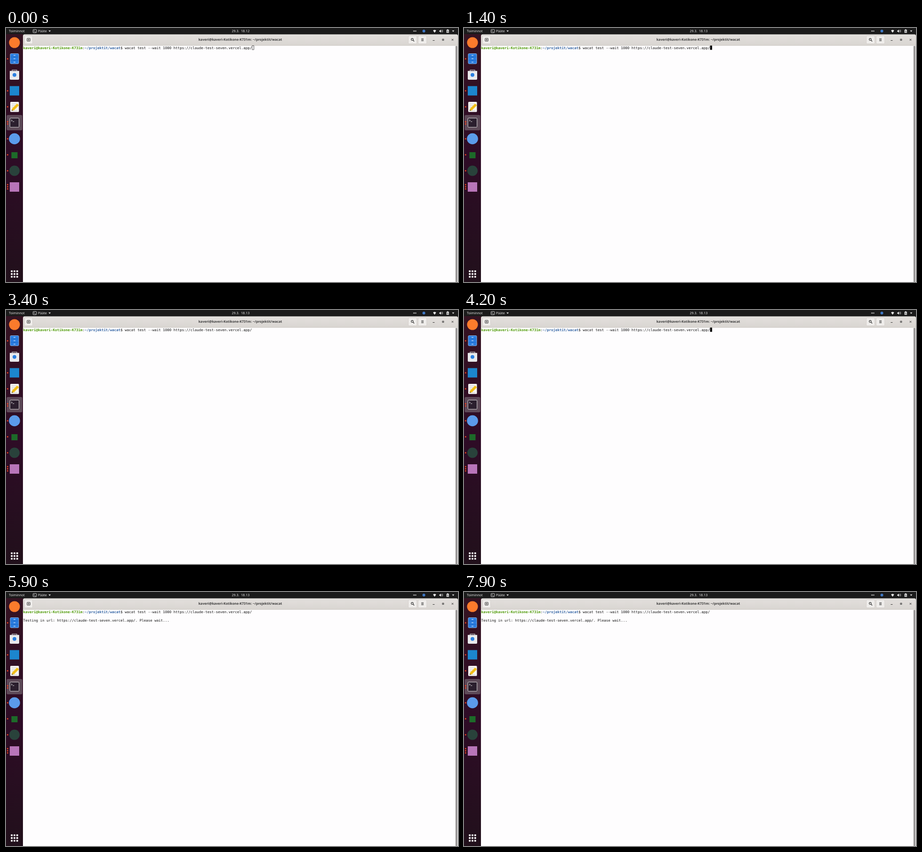
An HTML page that plays this animation: 960x540 px, repeating every 8 s.

```html
<!DOCTYPE html>
<html lang="fi">
<head>
<meta charset="utf-8">
<title>Terminal</title>
<style>
html, body { margin: 0; width: 100%; height: 100%; overflow: hidden; background: #fefdfe; }
svg { display: block; width: 960px; height: 540px; }
text { text-rendering: geometricPrecision; white-space: pre; }
.ui { font: 7.1px "Noto Sans", "Open Sans", sans-serif; fill: #e6e6e6; }
.title { font-weight: 700; fill: #3a3a3a; text-anchor: middle; }
.term { font: 7.475px "DejaVu Sans Mono", monospace; fill: #111; }
.user { font-weight: 700; fill: #4e9a06; }
.path { font-weight: 700; fill: #3465a4; }
.btn { fill: #efedeb; stroke: #cfc9c4; stroke-width: .7; }
.line { fill: none; stroke: #333; }
</style>
</head>
<body>
<svg viewBox="0 0 960 540" xmlns="http://www.w3.org/2000/svg">
  <defs>
    <linearGradient id="dock" x2="0" y2="1">
      <stop offset="0" stop-color="#351322"/>
      <stop offset=".5" stop-color="#2e0c26"/>
      <stop offset="1" stop-color="#21101b"/>
    </linearGradient>
    <linearGradient id="head" x2="0" y2="1">
      <stop offset="0" stop-color="#e3e0dd"/>
      <stop offset="1" stop-color="#d9d5d1"/>
    </linearGradient>
  </defs>

  <rect width="960" height="540" fill="#fefdfe"/>

  <!-- window header -->
  <rect x="36" y="13" width="924" height="6" fill="#1b1b1b"/>
  <path d="M36 37V17q0-3.5 3.5-3.5H956.500q3.500 0 3.500 3.500V37z" fill="url(#head)"/>
  <path d="M36 37.200H960" stroke="#c4beb9" stroke-width=".8"/>
  <rect class="btn" x="39.500" y="16.500" width="17" height="17" rx="2"/>
  <rect class="btn" x="854.500" y="16.500" width="18" height="17" rx="2"/>
  <rect class="btn" x="875.500" y="16.500" width="18" height="17" rx="2"/>
  <g class="line">
    <rect x="44.800" y="22" width="6.400" height="6" rx=".6"/>
    <path d="M46.300 25H49.700M48 23.300V26.700"/>
    <circle cx="862.800" cy="24.300" r="2.200" stroke-width="1.100"/>
    <path d="M864.400 25.900L867 28.500" stroke-width="1.300"/>
    <path d="M882 22.800H887M882 25H887M882 27.200H887"/>
    <path d="M906.300 26.500H910.300"/>
    <rect x="926.900" y="23.700" width="2.800" height="2.600"/>
    <path d="M946.600 23.200L950.200 26.800M950.200 23.200L946.600 26.800"/>
  </g>
  <text class="ui title" x="497.500" y="27.400">kaveri@kaveri-Kotikone-K731m: ~/projektit/wacat</text>

  <!-- scrollbar -->
  <rect x="953.500" y="37.600" width="6.500" height="503" fill="#ebe9e8"/>
  <rect x="955" y="38" width="3.500" height="502" rx="1.500" fill="#929090"/>

  <!-- top bar -->
  <rect width="960" height="13" fill="#1b1b1b"/>
  <text class="ui" x="6" y="9.200">Toiminnot</text>
  <text class="ui" x="68" y="9.200">Pääte</text>
  <text class="ui" id="clock" x="479.400" y="9.200"></text>
  <g fill="none" stroke="#e6e6e6" stroke-width=".9">
    <rect x="57.400" y="3.200" width="7.400" height="6.800" rx="1"/>
    <path d="M59 5L60.500 6.300L59 7.600M61.200 8.200H63"/>
  </g>
  <g fill="#e6e6e6">
    <path d="M90.300 5.300H95.100L92.700 8.300zM947.400 5.300H952.200L949.800 8.300z"/>
    <circle cx="865.800" cy="6.500" r="1"/>
    <circle cx="868.200" cy="6.500" r="1"/>
    <circle cx="870.600" cy="6.500" r="1"/>
    <path d="M910.300 10L907 5.500Q910.300 2.700 913.600 5.500z"/>
    <path d="M920.300 5.200H922L924 3.200V9.900L922 7.900H920.300z"/>
    <path d="M935.600 3.700H937V2.800H939.200V3.700H940.700V10.300H935.600z"/>
  </g>
  <path d="M925.200 4.800Q926.400 6.500 925.200 8.200M926.700 3.600Q928.800 6.500 926.700 9.400" fill="none" stroke="#e6e6e6" stroke-width=".8"/>
  <path d="M938.500 4.700L937 7.200H939.300L938 9.500" fill="none" stroke="#1b1b1b" stroke-width=".7"/>
  <circle cx="887.500" cy="6.500" r="3" fill="#3f78c4"/>

  <!-- dock -->
  <rect y="13" width="36" height="527" fill="url(#dock)"/>
  <rect x="2" y="185.500" width="32" height="31.500" rx="1.500" fill="#5d4a58" stroke="#756470" stroke-width=".6"/>
  <circle cx="18" cy="31" r="11.500" fill="#fb7b2c"/>

  <rect x="9" y="54.500" width="18" height="21.500" rx="1.800" fill="#2a7de0" stroke="#a9cdf4" stroke-width=".8"/>
  <path d="M9.500 61.600H26.500M9.500 68.800H26.500" stroke="#1c61b8" stroke-width=".7"/>
  <path d="M16 58.300H20M16 65.300H20M16 72.500H20" stroke="#e8f2fd" stroke-width="1.100"/>

  <path d="M13 92V89.300H23V92" fill="none" stroke="#b9bcc0" stroke-width="1.300"/>
  <path d="M8 91.300H28V108Q28 110 26 110H10Q8 110 8 108z" fill="#e9eaec"/>
  <circle cx="18" cy="99.800" r="4" fill="#2b7fe0"/>

  <rect x="8" y="123.500" width="20" height="20" fill="#1c86ce"/>

  <rect x="9" y="157" width="18.500" height="21.500" rx="1.600" fill="#f6f5f3"/>
  <path d="M11.500 161H22M11.500 164.500H19M11.500 168H16.500M11.500 175.500H24.500" stroke="#cbc9c7" stroke-width=".9"/>
  <path d="M13 171L23.500 160.500L27.500 164.500L17 175L12 176z" fill="#f6c421"/>
  <path d="M15 173L25.500 162.500" stroke="#dda20e" stroke-width="1"/>
  <path d="M12 176L12.600 173.200L14.800 175.400z" fill="#4d4238"/>

  <rect x="8.300" y="191.500" width="19.400" height="19.500" rx="1.600" fill="#2b1f2e" stroke="#d9d7d8" stroke-width="1"/>
  <path d="M11 195L13.300 196.700L11 198.400M14.300 199H17.300" fill="none" stroke="#fff" stroke-width=".9"/>

  <circle cx="18" cy="235.500" r="11.800" fill="#5b9bea"/>
  <rect x="11.500" y="264" width="13" height="13" fill="#1d6a29"/>
  <circle cx="18" cy="303.500" r="11" fill="#29423b"/>
  <rect x="8" y="328" width="20" height="20" fill="#b875b9"/>
  <g id="dots" fill="#e9431f"></g>
  <g id="grid" fill="#f4f2f3"></g>

  <!-- terminal -->
  <text class="term" x="36.500" y="45"><tspan class="user">kaveri@kaveri-Kotikone-K731m</tspan>:<tspan class="path">~/projektit/wacat</tspan>$ wacat test --wait 1000 https://claude-test-seven.vercel.app/</text>
  <text class="term" id="output" x="36.500" y="63">Testing in url: https://claude-test-seven.vercel.app/. Please wait...</text>
  <rect id="cursor"/>
</svg>
<script>
const LOOP = 8000, BLINK = 600;
const FOCUS = 200, MINUTE = 500, ENTER = 4800, PRINT = 5000;
const CELL_W = 4.5, LINE_H = 9, LEFT = 36.5, TOP = 37.4;
const PROMPT_COLS = 108;

const $ = id => document.getElementById(id);
const clock = $("clock"), output = $("output"), cursor = $("cursor");

function add(parent, tag, attrs) {
  const el = document.createElementNS("http://www.w3.org/2000/svg", tag);
  set(el, attrs);
  parent.appendChild(el);
}

function set(el, attrs) {
  for (const key in attrs) el.setAttribute(key, attrs[key]);
}

for (const cy of [65.5, 133.5, 167.5, 199.3, 204, 235.5, 269.5, 303.5, 333, 337.5, 342])
  add($("dots"), "circle", { cx: 3.4, cy, r: 1.5 });

for (let i = 0; i < 9; i++)
  add($("grid"), "rect", {
    x: 10.3 + 5.8 * (i % 3), y: 515.3 + 5.8 * Math.floor(i / 3),
    width: 3.8, height: 3.8, rx: 1
  });

function drawCursor(t) {
  const focused = t >= FOCUS;
  const start = t < ENTER ? FOCUS : ENTER;
  const lit = !focused || Math.floor((t - start) / BLINK) % 2 === 0;
  const col = t < ENTER ? PROMPT_COLS : 0;
  const row = t < ENTER ? 0 : t < PRINT ? 1 : 4;
  const inset = focused ? 0 : 0.35;
  set(cursor, {
    x: LEFT + col * CELL_W + inset,
    y: TOP + row * LINE_H + inset,
    width: CELL_W - 2 * inset,
    height: LINE_H - 2 * inset,
    fill: focused ? "#0a0a0a" : "none",
    stroke: focused ? "none" : "#111",
    "stroke-width": 0.7,
    visibility: lit ? "visible" : "hidden"
  });
}

function render(t) {
  clock.textContent = "29.3.\u00a0\u00a018." + (t < MINUTE ? "12" : "13");
  output.setAttribute("visibility", t < PRINT ? "hidden" : "visible");
  drawCursor(t);
}

const begin = performance.now();
function tick() {
  render((performance.now() - begin) % LOOP);
  requestAnimationFrame(tick);
}
render(0);
requestAnimationFrame(tick);
</script>
</body>
</html>
```
